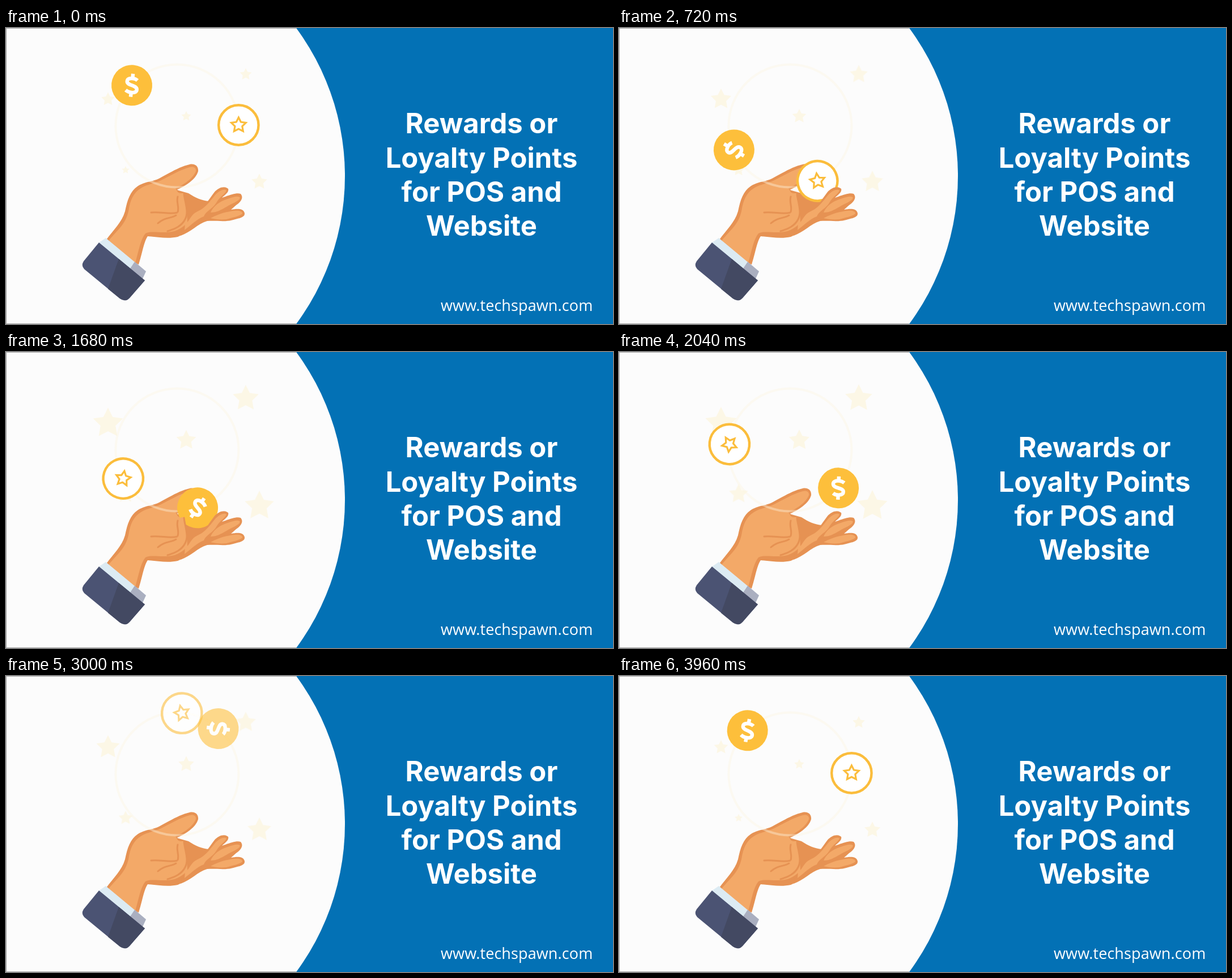
An HTML page that plays this animation: 1071 px wide and 523 px high, repeating every 4000 ms.

```html
<!DOCTYPE html>
<html lang="en">
<head>
<meta charset="utf-8">
<title>Rewards or Loyalty Points</title>
<style>
  html, body { margin: 0; width: 100%; height: 100%; overflow: hidden; background: #0371b5; }
  svg { display: block; width: 100%; height: 100%; }
  .title { font: 700 49px Inter, sans-serif; text-anchor: middle; }
  .site { font: 400 27px "Open Sans", sans-serif; letter-spacing: .1px; }
  .light { fill: #f3a968; }
  .dark { fill: #e69253; }
  .crease { fill: none; stroke: #e69253; stroke-width: 3; stroke-linecap: round; }
</style>
</head>
<body>
<svg viewBox="0 0 1071 523">
  <rect width="1071" height="523" fill="#0371b5"/>
  <circle cx="157.4" cy="261.5" r="440.6" fill="#fcfcfc"/>
  <path d="M512 .5H.5V522.5H512" fill="none" stroke="#a2a2a2"/>

  <g id="palm">
    <path class="dark" d="M177 374 C190 356 204 344 210 324 C214 304 219 288 233 279 C246 271 258 272 270 266 C287 257 306 245 324 241 C333 239 340 244 339 253 C336 266 318 279 301 286 L322 292 C334 300 346 305 358 306 L350 338 C335 348 322 361 303 369 C286 373 264 369 250 368 C243 378 240 400 234 418 L228 415Z"/>
    <path class="light" d="M181 376 C199 354 210 348 216 324 C219 304 225 291 238 283 C249 276 262 275 274 269 C290 261 306 251 324 246 C332 244 336 248 335 253 C331 264 315 277 299 283 L304 291 L318 293 L320 344 C309 356 295 362 278 361 C264 361 254 359 246 363 C237 374 234 395 228 415Z"/>
    <path class="dark" d="M300 285 C304 291 305 293 313 291 C326 294 340 306 352 306 L328 327 L315 322 C317 307 315 297 311 291Z"/>
    <path class="crease" d="M256 326 C274 324 287 330 303 326 M268 345 C280 334 290 337 300 331"/>
  </g>

  <g id="stars" fill="#fcf6e4" opacity=".9"></g>
  <circle cx="302" cy="173" r="108.5" fill="none" stroke="#fcf5e2" stroke-width="4" opacity=".4"/>

  <g id="starCoin">
    <circle r="35.2" fill="#fff" stroke="#fbbd3c" stroke-width="4.4"/>
    <path id="coinStar" fill="none" stroke="#fbbd3c" stroke-width="3.2"/>
  </g>
  <g id="dollarCoin">
    <circle r="36" fill="#fdbf3b"/>
    <path d="M9 -9.5 C4 -13.5 -9 -13.5 -9 -6.5 C-9 2 9.5 -2 9.5 7 C9.5 14.5 -4 14 -10 9.5 M0 -20.5V-12 M0 20.5V12" fill="none" stroke="#fff" stroke-width="6.4"/>
  </g>

  <g id="fingers">
    <path class="dark" d="M310 357 C323 344 325 330 337 324 C350 317 358 303 367 291 C375 281 386 279 392 284 C394 290 386 295 381 300 C390 297 406 290 414 293 C420 300 414 308 406 313 L397 321 C407 319 419 318 421 327 C422 335 411 336 401 339 C387 343 373 340 355 341 C338 346 326 361 308 367Z"/>
    <path class="light" d="M316 347 C325 340 326 329 338 324 C352 318 360 306 369 295 C377 286 386 284 389 287 C387 293 376 299 371 309 C364 320 353 323 349 333 C336 338 327 348 315 357Z"/>
    <path class="light" d="M361 326 C366 314 378 306 391 302 C402 298 411 296 413 300 C411 307 397 310 389 316 C380 321 372 326 361 326Z"/>
    <path class="light" d="M361 336 C376 328 391 324 403 323 C412 322 417 324 417 328 C412 333 401 334 389 338 C378 339 370 338 361 336Z"/>
    <path class="light" d="M302 300 C307 290 315 289 315 297 C317 310 322 325 316 337 C309 350 297 354 286 358 C280 350 299 342 302 331 C305 320 297 310 302 300Z"/>
    <path class="crease" d="M303 298 C300 308 306 315 303 325 M314 293 C316 310 323 325 316 338 C310 350 298 355 285 359"/>
  </g>

  <path d="M176 371 L247 430 L241 443 L163 380Z" fill="#dcebf3"/>
  <path d="M227 413 L247 430 L241 443 L219 425Z" fill="#aaafc0"/>
  <path d="M164 379 L245 446 L218 477 Q211 485 201 478 L138 426 Q132 420 137 412Z" fill="#4b5373"/>
  <path d="M199 408 L245 446 L218 477 Q211 485 201 478 L180 461Z" fill="#434962"/>

  <g fill="#fff">
    <g class="title">
      <text x="839" y="186">Rewards or</text>
      <text x="839" y="246.5">Loyalty Points</text>
      <text x="839" y="307">for POS and</text>
      <text x="839" y="367">Website</text>
    </g>
    <text class="site" x="767" y="500">www.techspawn.com</text>
  </g>
</svg>
<script>
const LOOP = 4000, STAR_START = 20, STAR_TURN = 3900;
const CENTER = { x: 302.4, y: 173.4 }, ORBIT = 108;
const MEETINGS = [1226, 3206]; // moments when the coins cross
const el = id => document.getElementById(id);
const clamp = v => Math.max(0, Math.min(1, v));

function starPath(radius, inner) {
  const points = Array.from({ length: 10 }, (_, i) => {
    const r = i % 2 ? radius * inner : radius, a = i * Math.PI / 5;
    return (r * Math.sin(a)).toFixed(3) + ' ' + (-r * Math.cos(a)).toFixed(3);
  });
  return 'M' + points.join('L') + 'Z';
}

// x, y, smallest and largest radius
const stars = [
  [180, 126, 12.5, 29], [423, 82, 11, 25], [318, 156, 9, 19],
  [211, 251, 7, 17.5], [447, 272, 14.5, 28]
].map(([x, y, min, max]) => {
  const node = document.createElementNS('http://www.w3.org/2000/svg', 'path');
  node.setAttribute('d', starPath(1, 0.5));
  el('stars').append(node);
  return { node, x, y, min, max };
});
el('coinStar').setAttribute('d', starPath(13.5, 0.5));

// angle runs clockwise from the top of the orbit
function placeCoin(id, angle, spin, opacity) {
  const a = angle * Math.PI / 180;
  const x = CENTER.x + ORBIT * Math.sin(a), y = CENTER.y - ORBIT * Math.cos(a);
  el(id).setAttribute('transform', `translate(${x} ${y}) rotate(${spin})`);
  el(id).setAttribute('opacity', opacity);
}

function draw(now) {
  const t = now % LOOP;
  const gap = Math.min(...MEETINGS.map(m => Math.abs(t - m)));
  const opacity = clamp((gap - 45) / 270);
  const starSpin = 360 * clamp((t - STAR_START) / STAR_TURN);
  const dollarSpin = -360 * t / LOOP;
  placeCoin('starCoin', 89 + starSpin, starSpin, opacity);
  placeCoin('dollarCoin', dollarSpin - 48, dollarSpin + 6, opacity);

  const growth = clamp(1.1 * (1 - Math.abs(2 * t / LOOP - 1)));
  for (const { node, x, y, min, max } of stars)
    node.setAttribute('transform', `translate(${x} ${y}) scale(${min + (max - min) * growth})`);
}

const start = performance.now();
function tick() {
  draw(performance.now() - start);
  requestAnimationFrame(tick);
}
tick();
</script>
</body>
</html>
```
